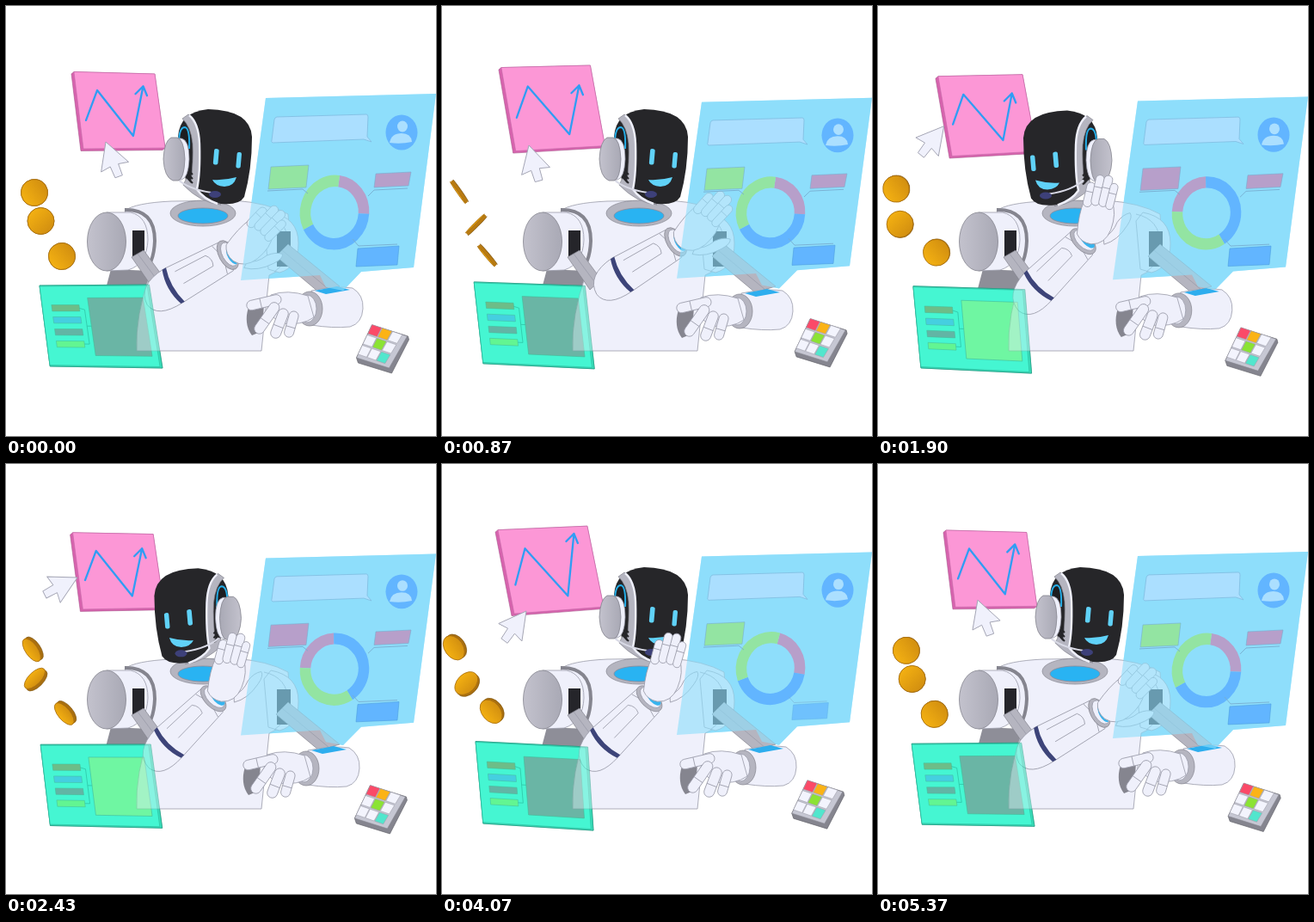
Recreate the animation shown at these times as an HTML page. Size 500 by 500 pixels, loop 5410 ms.

```html
<!DOCTYPE html>
<html lang="en">
<head>
<meta charset="utf-8">
<title>Robot assistant</title>
<style>
html,body{margin:0;width:100%;height:100%;overflow:hidden;background:#fff}
svg{display:block;width:100vw;height:100vh}
.w{fill:#eff0fb;stroke:#9a9ba9;stroke-width:.8;stroke-linejoin:round}
.g{fill:#b5b5c0;stroke:#85858f;stroke-width:.7}
.l{fill:none;stroke:#9a9ba9;stroke-width:.8}
.wire{fill:none;stroke:#78add0;stroke-width:.9}
.ring{fill:none;stroke-width:12.5}
</style>
</head>
<body>
<svg viewBox="0 0 500 500" xmlns="http://www.w3.org/2000/svg">
<defs>
  <linearGradient id="metal"><stop stop-color="#c3c2cd"/><stop offset="1" stop-color="#a9a9b5"/></linearGradient>
  <linearGradient id="gold"><stop stop-color="#f3b012"/><stop offset="1" stop-color="#d28f10"/></linearGradient>
  <path id="sheet" d="M302 107L500 102L474 304L413 309L392 331L372 327L365 313L273 319Z"/>
</defs>

<use id="sheetBack" href="#sheet" fill="#8fdffc"/>

<g id="pink">
  <path id="pinkSide" fill="#d763ae" stroke="#a8568c" stroke-width=".6"/>
  <path id="pinkFace" fill="#fc97d6" stroke="#c56ba8" stroke-width=".6"/>
  <path id="chart" fill="none" stroke="#2f9df4" stroke-width="2.3" stroke-linecap="round" stroke-linejoin="round"/>
</g>

<path fill="#8e8e98" d="M122 306L168 308L175 365L113 340Z"/>
<use href="#green"/>

<g id="body">
  <path class="w" d="M138 238Q150 229 192 227L265 226Q305 229 328 242L332 300L306 313L297 401H152Q150 360 168 310L150 260Z"/>
  <path class="w" d="M308 240Q340 246 340 276Q340 304 318 310L305 306L300 250Z"/>
  <path class="l" d="M300 242Q328 248 328 277Q327 300 312 309"/>
  <path fill="#2b2b31" d="M315 262H331V303H315Z"/>
  <path class="g" d="M314 291L328 277L388 326L364 333Z"/>
  <path class="l" d="M321 284L376 330"/>
  <ellipse class="g" cx="229" cy="241" rx="38" ry="15"/>
  <ellipse cx="229" cy="244" rx="29" ry="9" fill="#29b3f2" stroke="#8a8a98" stroke-width=".8"/>
  <path class="w" d="M117 240L145 240Q165 245 165 272Q164 300 142 307L117 308Z"/>
  <path fill="none" stroke="#85858f" stroke-width="4" d="M138 237Q173 236 173 273Q172 301 158 310"/>
  <path fill="#25252a" d="M147 261H161V291H147Z"/>
  <path class="g" d="M146 292L160 284L185 318L172 330Z"/>
  <path class="l" d="M153 288L179 323"/>
  <ellipse cx="117" cy="274" rx="22.5" ry="34" fill="url(#metal)" stroke="#85858f" stroke-width=".8"/>
</g>

<g id="head">
  <g id="skull">
    <path fill="#262629" d="M200 152Q202 123 235 120Q284 121 286 152Q286 190 277 222Q271 232 250 230Q222 226 210 208Z"/>
    <path class="g" d="M205 131L212 126Q224 134 225 160Q226 195 222 213Q232 225 250 231Q226 229 206 208L210 200L215 206Q218 180 217 160Q215 140 205 131Z"/>
    <path fill="none" stroke="#eff0fb" stroke-width="2.4" d="M213 127Q224 136 225 160Q226 195 222 213Q229 224 246 230"/>
    <path fill="#1d1d20" stroke="#25aee8" stroke-width="2" d="M201 160Q201 141 208 141Q214 142 213 166"/>
    <path stroke="#262629" stroke-width="2" d="M209 188L217 196M209 193L217 201M209 198L217 206"/>
  </g>
  <g id="face" fill="#60d2f8">
    <rect x="241.5" y="166" width="5.6" height="18.5" rx="2" transform="rotate(5 244 175)"/>
    <rect x="268" y="170" width="5.4" height="18.5" rx="2" transform="rotate(5 271 179)"/>
    <path d="M240 202Q254 203 268 199Q265 210 254 210Q243 209 240 202Z"/>
  </g>
  <g id="mic">
    <path fill="none" stroke="#d9dae6" stroke-width="2" d="M199 201Q212 213 239 217"/>
    <ellipse cx="243" cy="219" rx="7" ry="4" fill="#3d4079"/>
  </g>
  <g id="headset">
    <path class="w" d="M192 154H204Q213 156 213 178Q212 200 204 202L195 202Z"/>
    <path fill="url(#metal)" stroke="#85858f" stroke-width=".8" d="M192 153H199Q207 155 208 178Q207 202 200 203H194Q184 199 183 178Q184 157 192 153Z"/>
  </g>
</g>

<g id="restArm">
  <path class="w" d="M355 331Q385 325 403 328Q416 336 415 352Q414 369 400 373Q380 375 355 371Z"/>
  <path fill="#2eaeee" d="M359 331L385 326L400 330L372 335Z"/>
  <ellipse class="g" cx="353" cy="352" rx="15" ry="20"/>
  <ellipse class="w" cx="350" cy="352" rx="11" ry="16"/>
  <path fill="#85858f" d="M282 350L300 346L298 378L286 383Q276 370 282 350Z"/>
  <path class="w" d="M351 337Q327 329 308 336L303 356L320 369Q344 372 358 362Z"/>
  <g id="restFingers"></g>
</g>

<g id="forearm">
  <path class="w" d="M0 -22L70 -18Q80 0 70 19L0 23Q-34 25 -37 5Q-36 -20 0 -22Z"/>
  <path fill="#3d4479" d="M-2 -22H3Q-4 0 3 23H-2Q-10 0 -2 -22Z"/>
  <path class="l" d="M10 -13L50 -12Q56 -5 52 3L12 4M62 -18Q69 0 62 19"/>
  <ellipse class="g" cx="73" cy="0" rx="10" ry="18.5"/>
  <ellipse class="w" cx="75" cy="0" rx="8" ry="15"/>
  <ellipse cx="77" cy="3" rx="5" ry="11" fill="#37b4ee"/>
</g>
<g id="hand">
  <path class="w" d="M21 -6Q31 -12 34 -26Q39 -36 47 -39Q51 -35 46 -24Q38 -5 23 2Z"/>
  <path class="w" d="M-10 -5Q-12 -28 -8 -45L24 -49Q32 -36 28 -16Q24 2 8 4Q-4 4 -10 -5Z"/>
  <g id="fingers"></g>
</g>

<g opacity=".6">
  <g id="green">
    <path id="greenSide" fill="#38dfba" stroke="#259c84" stroke-width=".8"/>
    <path id="greenFace" fill="#45f6d2" stroke="#2bb89a" stroke-width=".6"/>
    <path id="greenWire" fill="none" stroke="#2fc5a6" stroke-width=".8"/>
    <g id="bars"></g>
    <path id="picture" stroke="#44b997" stroke-width=".6"/>
  </g>
</g>

<g id="sheetFront">
  <use href="#sheet" fill="#8fdffc" opacity=".62"/>
  <path fill="#abdfff" stroke="#80bce0" stroke-width=".8" d="M315 129L419 126Q421 126 421 129L420 152L425 158L416 155L310 159Q308 158 309 156L312 132Q313 129 315 129Z"/>
  <ellipse cx="460" cy="147" rx="18.5" ry="20.5" fill="#62b5ff"/>
  <ellipse cx="461" cy="140" rx="6" ry="6.5" fill="#abdfff"/>
  <path fill="#abdfff" d="M446 159Q448 148 460 148Q471 148 472 158Q459 161 446 159Z"/>
  <g transform="translate(382 240) rotate(8) scale(1 1.08)">
    <g id="donut">
      <circle class="ring" r="34" pathLength="360" stroke="#b79fca" stroke-dasharray="85 275" transform="rotate(-90)"/>
      <circle class="ring" r="34" pathLength="360" stroke="#62b5ff" stroke-dasharray="150 210" transform="rotate(-5)"/>
      <circle class="ring" r="34" pathLength="360" stroke="#93e4a2" stroke-dasharray="125 235" transform="rotate(145)"/>
    </g>
  </g>
  <g id="labelLeft"><path class="wire" d="M304 215L345 213L351 218"/><path id="leftBox" stroke="#78add0" stroke-width=".6" d="M308 187L352 185L349 211L305 213Z"/></g>
  <g id="labelRight"><path class="wire" d="M421 221L428 214L467 212"/><path fill="#b79fca" stroke="#78add0" stroke-width=".6" d="M430 195L471 193L468 209L428 211Z"/></g>
  <g id="labelLow"><path class="wire" d="M403 271L410 279L455 277"/><path fill="#62b5ff" stroke="#4d9fdf" stroke-width=".6" d="M409 282L457 279L455 301L407 303Z"/></g>
</g>

<path id="cursor" fill="#f0f1fc" stroke="#a4a5b4" stroke-width=".9" stroke-linejoin="round" d="M0 0L17 31L5 29L5 43L-4 43L-5 29L-17 31Z"/>
<g id="coins"></g>
<g id="pad">
  <path fill="#85858f" stroke="#66666e" stroke-width=".7" stroke-linejoin="round" d="M425 371L467 384L468 388L448 427L409 415L407 409Z"/>
  <path fill="#c6c7d3" stroke="#85858f" stroke-width=".6" d="M425 371L466 384L445 421L407 409Z"/>
  <g id="keys"></g>
</g>
</svg>

<script>
const LOOP = 5410, TAU = Math.PI * 2;
const $ = id => document.getElementById(id);
const set = (id, name, value) => $(id).setAttribute(name, value);
const clamp = x => Math.max(0, Math.min(1, x));
const ease = (t, a, b) => (1 - Math.cos(Math.PI * clamp((t - a) / (b - a)))) / 2;
const path = pts => 'M' + pts.map(p => p.map(n => n.toFixed(2)).join(' ')).join('L');

// Looping cubic through values at these times.
const TIMES = [0, 870, 1430, 2430, 3270, 4070];
function spline(t, values) {
  const n = TIMES.length;
  const at = i => TIMES[(i + n) % n] + LOOP * Math.floor(i / n);
  const val = i => values[(i + n) % n];
  const slope = i => (val(i + 1) - val(i - 1)) / (at(i + 1) - at(i - 1));
  let i = n - 1;
  while (TIMES[i] > t) i--;
  const d = at(i + 1) - at(i), s = (t - at(i)) / d, r = 1 - s;
  return r * r * (1 + 2 * s) * val(i) + s * s * (3 - 2 * s) * val(i + 1)
    + d * s * r * (r * slope(i) - s * slope(i + 1));
}

// Floating point: [x, x cos, x sin, y, y cos, y sin], twice per loop.
const float = (k, c, s) => [k[0] + k[1] * c + k[2] * s, k[3] + k[4] * c + k[5] * s];
const PINK = [[72, 7, 0, 76.5, 0, -5.5], [171, 2, 2.5, 75.5, 3.5, -5.5],
  [186.5, -1.5, 2.5, 165.5, -.5, -3.5], [87, 3, 0, 170, -4, -3.5]];
const GREEN = [[39, 0, -2, 323.7, 1.3, -2.5], [168, -1.5, -2.5, 326.5, -2.5, -2.5],
  [179, 3, -.5, 423.5, -2.5, -3], [49.5, 1.7, -1, 418.5, .5, -2.7]];
const COINS = [
  { move: [24, 9, 0, 215, 2, 2], tilt: -35 },
  { move: [35, 5.5, 8, 253, -3, 0], tilt: 45 },
  { move: [61.5, 3.5, -8, 289, 2, 2], tilt: -40 }];

const inQuad = ([a, b, c, d]) => (u, v) => [0, 1].map(i =>
  (a[i] * (1 - u) + b[i] * u) * (1 - v) + (d[i] * (1 - u) + c[i] * u) * v);
const boxIn = (q, u, v, u2, v2) => path([q(u, v), q(u2, v), q(u2, v2), q(u, v2)]) + 'Z';

const finger = (x, y, length, angle, width) => `<g transform="translate(${x} ${y}) rotate(${angle})">
  <rect class="w" x="${-width / 2}" y="${-length}" width="${width}" height="${length + 4}" rx="${width / 2}"/>
  <path class="l" d="M${-width / 2} ${-length * .55}H${width / 2}"/></g>`;
$('fingers').innerHTML = finger(-4, -42, 25, 4, 10) + finger(5, -45, 32, 3, 10)
  + finger(14, -45, 33, 4, 10) + finger(22, -43, 27, 5, 9);
$('restFingers').innerHTML = finger(316, 341, 37, -103, 11.5) + finger(313, 349, 38, -145, 12)
  + finger(323, 356, 32, -159, 12) + finger(335, 359, 27, -164, 11);

const BAR_FILLS = ['#6dbd88', '#45cfe0', '#62b5a5', '#62f592'];
$('bars').innerHTML = BAR_FILLS.map(f => `<path fill="${f}" stroke="#44b997" stroke-width=".5"/>`).join('');
$('coins').innerHTML = COINS.map(() => `<g><ellipse ry="15.5" fill="#a96f10" stroke="#7c5310" stroke-width=".6"/>
  <rect y="-15.5" height="31" rx="2" fill="#b97b12"/>
  <ellipse ry="15.5" fill="url(#gold)" stroke="#a96f10" stroke-width=".8"/></g>`).join('');

const KEY_FILLS = { 0: '#fb4a68', 1: '#fbb316', 4: '#8be334', 8: '#52e6cd' };
const padPoint = inQuad([[425, 370], [461, 382], [440, 417], [408, 406]]);
$('keys').innerHTML = Array.from({ length: 9 }, (_, i) => {
  const u = i % 3 / 3, v = Math.floor(i / 3) / 3;
  return `<path d="${boxIn(padPoint, u + .01, v + .01, u + .32, v + .3)}" fill="${KEY_FILLS[i] || '#f3f4fd'}"
    stroke="#9fa0ac" stroke-width=".6" stroke-linejoin="round"/>`;
}).join('');

function drawPink(c, s, wave) {
  const corners = PINK.map(k => float(k, c, s)), q = inQuad(corners);
  const [a, b, d, e] = corners;
  const shift = p => [p[0] - 3, p[1] + 2.5];
  set('pinkSide', 'd', path([a, b, d, shift(d), shift(e), shift(a)]) + 'Z');
  set('pinkFace', 'd', path(corners) + 'Z');
  const v = .17 + .085 * wave, tip = q(.835, v);
  set('chart', 'd', path([q(.075, .63 - .03 * wave), q(.26, .235), q(.63, .835), tip])
    + path([[tip[0] - 9, tip[1] + 9], tip, [tip[0] + 4.5, tip[1] + 11]]));
}

function drawGreen(c, s, bright) {
  const corners = GREEN.map(k => float(k, c, s)), q = inQuad(corners);
  set('greenSide', 'd', path(corners) + 'Z');
  set('greenFace', 'd', boxIn(q, 0, .01, .98, .985));
  set('greenWire', 'd', path([q(.33, .28), q(.38, .3), q(.38, .72), q(.33, .72)]) + path([q(.38, .5), q(.43, .5)]));
  [...$('bars').children].forEach((bar, i) =>
    bar.setAttribute('d', boxIn(q, .085, .24 + .148 * i, .335, .318 + .148 * i)));
  set('picture', 'd', boxIn(q, .42, .155, .925, .86));
  set('picture', 'fill', bright ? '#6ff6a2' : '#6ab5a5');
}

function drawCoins(t, c, s) {
  const turn = TAU * 1.5 * t / LOOP, width = 15.5 * Math.abs(Math.cos(turn));
  const depth = 2 * Math.abs(Math.sin(turn));
  COINS.forEach(({ move, tilt }, i) => {
    const g = $('coins').children[i], [back, edge, front] = g.children;
    g.setAttribute('transform', `translate(${float(move, c, s)}) rotate(${tilt})`);
    for (const [part, x] of [[back, depth], [front, -depth]]) {
      part.setAttribute('cx', x);
      part.setAttribute('rx', width);
    }
    edge.setAttribute('x', -depth);
    edge.setAttribute('width', 2 * depth);
  });
}

function drawHead(t) {
  const look = 1 - 2 * ease(t, 1060, 1420) + 2 * ease(t, 2300, 2870);
  const side = look < 0 ? -1 : 1, away = 1 - Math.abs(look);
  const lean = (1 - look) / 2;
  set('head', 'transform', `translate(227.5 ${1.5 * lean}) scale(${side} 1) translate(-227.5 0)`);
  set('skull', 'transform', `translate(${-14 * away} 0)`);
  set('face', 'transform', `translate(${4 * lean - 26 * away} ${2 * lean})`);
  set('mic', 'transform', `translate(${17 * lean - 26 * away} 0)`);
  set('headset', 'transform', `translate(${-6 * away} 0)`);
}

function drawArms(t) {
  const x = spline(t, [194, 209, 188, 189, 192, 189]), y = spline(t, [325, 312, 324, 324, 323, 324]);
  const angle = spline(t, [-29, -31, -43, -44.5, -44.5, -44.5]), a = angle * TAU / 360;
  set('forearm', 'transform', `translate(${x} ${y}) rotate(${angle})`);
  set('hand', 'transform', `translate(${x + 76 * Math.cos(a)} ${y + 76 * Math.sin(a)}) rotate(${spline(t, [40, 38, 11, 11, 4, 11])})`);
  set('restArm', 'transform', `translate(${spline(t, [0, -7, -3, -4, -3, -3])} ${spline(t, [0, 3, 2, 2, 2, 1])})`);
}

function drawSheet(t) {
  const top = spline(t, [0, 4.7, 4.7, 2.5, 4.7, .5]), low = spline(t, [0, -2, 2, -3.5, 2, -4]);
  const stretch = (low - top) / 210;
  const warp = `matrix(1 0 0 ${1 + stretch} 0 ${top - 105 * stretch})`;
  set('sheetBack', 'transform', warp);
  set('sheetFront', 'transform', warp);
  set('donut', 'transform', `rotate(${-95 * ease(t, 1000, 1750) - 265 * ease(t, 3400, 4150)})`);

  // Labels leave together and grow back from (x, y) one by one.
  const show = (id, x, y, first, second) => {
    const start = t < 1000 ? -LOOP : t < 3400 ? first : second;
    const fadeOut = t < 1000 ? 0 : clamp(1 - (t - (t < 3400 ? 1000 : 3400)) / 120);
    const amount = Math.max(clamp((t - start) / 200), fadeOut), scale = .5 + amount / 2;
    set(id, 'opacity', amount);
    set(id, 'transform', `translate(${x} ${y}) scale(${scale}) translate(${-x} ${-y})`);
  };
  show('labelLeft', 351, 200, 1600, 3750);
  show('labelRight', 428, 202, 1650, 4150);
  show('labelLow', 406, 291, 1290, 3930);
  set('leftBox', 'fill', t > 1200 && t < 3600 ? '#b79fca' : '#93e4a2');
}

function drawCursor(t) {
  const x = spline(t, [116, 101, 75, 83, 82, 98]), y = spline(t, [158, 162, 150, 132, 143, 171]);
  set('cursor', 'transform', `translate(${x} ${y}) rotate(${spline(t, [-20, -15, 13, 63, 64, 37])})`);
}

function draw(t) {
  const phase = TAU * 2 * t / LOOP, c = Math.cos(phase), s = Math.sin(phase);
  drawPink(c, s, Math.sin(phase / 2));
  drawGreen(c, s, t > 1150 && t < 3600);
  drawCoins(t, c, s);
  drawHead(t);
  drawArms(t);
  drawSheet(t);
  drawCursor(t);
  set('pad', 'transform', `translate(${.2 + .3 * c + 3.4 * s} ${-1.5 + 1.5 * c - 5.5 * s})`);
}

let begin;
function tick(now) {
  begin ??= now;
  draw((now - begin) % LOOP);
  requestAnimationFrame(tick);
}
draw(0);
requestAnimationFrame(tick);
</script>
</body>
</html>
```
